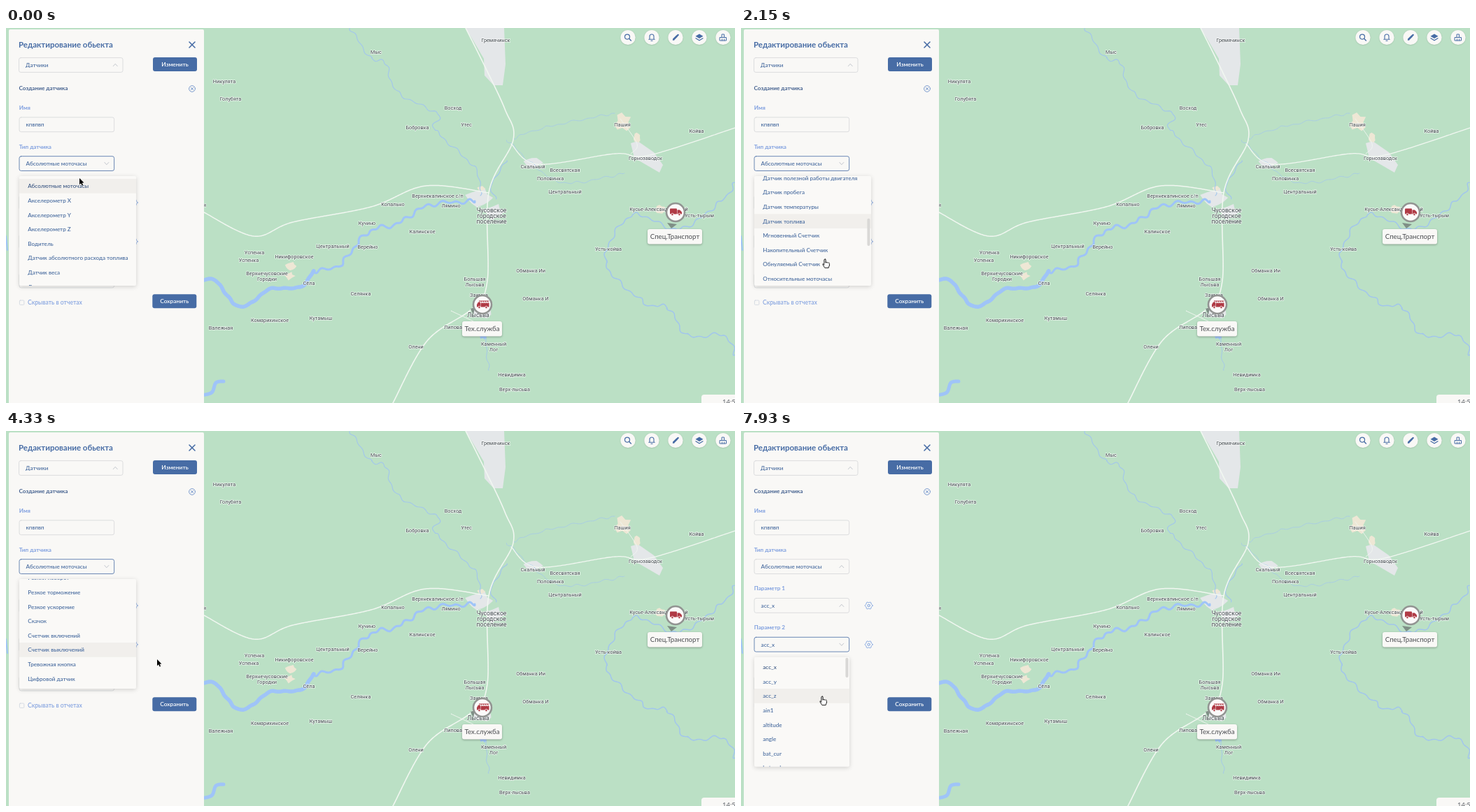
Recreate the animation shown at these times as an HTML page with a canvas. Size 1042 px wide and 537 px high, loop 7.99 s.

```html
<!DOCTYPE html>
<html lang="ru">
<head>
<meta charset="utf-8">
<title>Редактирование обьекта</title>
<style>
html, body { margin: 0; width: 100%; height: 100%; overflow: hidden; background: #bbe0c5; }
canvas { display: block; width: 1042px; height: 537px; }
</style>
</head>
<body>
<canvas id="stage" width="1042" height="537"></canvas>
<script>
const W = 1042, H = 537, LOOP = 7990, ROW = 20.6;
const BLUE = '#476ca5', LABEL = '#7f9fdf', PANEL = '#f9f8f6', INK = '#41669c', RED = '#b03a45';
const stage = document.getElementById('stage');
const screen = stage.getContext('2d');
let c = screen;

const clamp = v => Math.max(0, Math.min(1, v));
const smooth = p => p * p * (3 - 2 * p);
const easeOut = p => 1 - Math.pow(1 - p, 1.5);

// --- drawing helpers ---

function text(str, x, y, size, color, weight = 500, align = 'left') {
  c.font = `${weight} ${size}px Lato, sans-serif`;
  c.textAlign = align;
  c.fillStyle = color;
  c.fillText(str, x, y + size * 0.34);
}

function paint(fill, stroke, lw) {
  if (fill) { c.fillStyle = fill; c.fill(); }
  if (stroke) { c.strokeStyle = stroke; c.lineWidth = lw; c.stroke(); }
}

function box(x, y, w, h, r, fill, stroke, lw = 0.8) {
  c.beginPath();
  c.roundRect(x, y, w, h, r);
  paint(fill, stroke, lw);
}

function disc(x, y, r, fill, stroke, lw = 1) {
  c.beginPath();
  c.arc(x, y, r, 0, 7);
  paint(fill, stroke, lw);
}

function trace(pts) {
  c.beginPath();
  for (let i = 0; i < pts.length; i += 2) c.lineTo(pts[i], pts[i + 1]);
}

function line(pts, color, lw) {
  trace(pts);
  paint(null, color, lw);
}

function poly(pts, color, stroke, lw) {
  trace(pts);
  c.closePath();
  paint(color, stroke, lw);
}

function cross(x, y, r, color, lw) {
  line([x - r, y - r, x + r, y + r], color, lw);
  line([x + r, y - r, x - r, y + r], color, lw);
}

function shadowed(blur, dy, alpha, draw) {
  c.save();
  c.shadowBlur = blur;
  c.shadowOffsetY = dy;
  c.shadowColor = `rgba(0,0,0,${alpha})`;
  draw();
  c.restore();
}

// --- map ---

// Catmull-Rom curve through key points; wig adds meanders across it.
function curve(pts, color, lw, wig = 0) {
  const n = pts.length / 2, out = [];
  const at = (i, k) => pts[2 * Math.max(0, Math.min(n - 1, i)) + k];
  let run = 0;
  for (let i = 0; i < n - 1; i++) {
    const len = Math.hypot(at(i + 1, 0) - at(i, 0), at(i + 1, 1) - at(i, 1));
    for (let u = 0; u < 1; u += 2 / len) {
      const s = run + u * len;
      const w = wig * (Math.sin(s / 2.9) + 0.8 * Math.sin(s / 5.3 + 1));
      for (const k of [0, 1]) {
        const [a, b, d, e] = [-1, 0, 1, 2].map(j => at(i + j, k));
        const p = b + u * (d - a) / 2 + u * u * (a - 2.5 * b + 2 * d - e / 2) + u * u * u * (1.5 * (b - d) + (e - a) / 2);
        const side = (k ? 1 : -1) * (at(i + 1, 1 - k) - at(i, 1 - k)) / len;
        out.push(p + side * w);
      }
    }
    run += len;
  }
  out.push(...pts.slice(-2));
  line(out, color, lw);
}

// Irregular patch with a seeded outline.
function blob(x, y, rx, ry, color, seed) {
  const pts = [];
  for (let i = 0; i < 11; i++) {
    const a = i / 11 * Math.PI * 2;
    const r = 0.85 + 0.25 * Math.sin(seed * 7.3 + i * i * 2.1);
    pts.push(x + rx * r * Math.cos(a), y + ry * r * Math.sin(a));
  }
  poly(pts, color);
}

const PLACES = [
  ['Гремячинск', 700, 17], ['Мыс', 529, 34], ['Никулята', 312, 76], ['Голубята', 321, 101],
  ['Восход', 639, 114], ['Утес', 658, 138], ['Бобровка', 588, 142], ['Пашия', 881, 138],
  ['Койва', 987, 147], ['Горнозаводск', 914, 186], ['Скальный', 753, 198], ['Всесвятская', 799, 203],
  ['Половинка', 778, 215], ['Центральный', 799, 234], ['Верхнекалинское с/п', 617, 240],
  ['Копально', 553, 252], ['Лямино', 636, 254], ['Кучино', 516, 279], ['Калинское', 595, 291],
  ['Центральный', 467, 312], ['Верейно', 517, 313], ['Успенка', 355, 321], ['Успенка', 347, 332],
  ['Никифоровское', 412, 327], ['Верхнечусовские\nГородки', 373, 351], ['Сёла', 433, 365],
  ['Селянка', 507, 380], ['Кутамыш', 450, 415], ['Комарихинское', 377, 418], ['Валежная', 307, 429],
  ['Олени', 586, 456], ['Невидимка', 723, 496], ['Верх-лысьва', 727, 517], ['Каменный\nЛог', 697, 452],
  ['Липовая', 641, 428], ['Большая\nЛысьва', 670, 359], ['Заимка', 676, 382], ['Обманка Ии', 750, 347],
  ['Обманка И', 757, 387], ['Усть-койва', 861, 316], ['Усть-тырым', 991, 268],
  ['Кусье-Александровский', 933, 259], ['ая', 282, 253],
  ['Чусовское\nгородское\nпоселение', 694, 261, 8.6], ['Лысьва', 675, 411, 8.6]
];

function drawPlaces() {
  c.textAlign = 'center';
  for (const [name, x, y, size = 7.3] of PLACES) {
    c.font = `400 ${size}px Roboto, sans-serif`;
    c.strokeStyle = 'rgba(255,255,255,.75)';
    c.lineWidth = 1.6;
    c.fillStyle = '#3f474b';
    name.split('\n').forEach((s, i) => {
      const base = y + i * 8 + size * 0.35;
      c.strokeText(s, x, base);
      c.fillText(s, x, base);
    });
  }
}

function drawMap() {
  const water = '#9fc4f8', thin = '#a2c6ec', road = '#f1f7f1', town = '#e4e7e9', field = '#eee7d5';
  c.fillStyle = '#bbe0c5';
  c.fillRect(0, 0, W, H);

  poly([657, 0, 712, 0, 714, 52, 710, 82, 697, 82, 684, 68, 683, 44, 669, 20], town);
  poly([893, 165, 903, 162, 926, 178, 939, 196, 934, 207, 898, 186], town);
  blob(676, 243, 19, 13, town, 1);
  blob(697, 263, 17, 12, town, 2);
  blob(753, 193, 17, 10, town, 3);
  blob(681, 403, 18, 17, town, 4);
  blob(882, 135, 12, 13, field, 5);
  blob(902, 157, 5, 7, field, 6);
  blob(407, 341, 8, 6, field, 7);
  blob(405, 355, 8, 6, field, 8);
  blob(679, 230, 7, 5, field, 9);
  blob(935, 260, 9, 8, field, 10);

  curve([492, 0, 522, 44, 541, 48, 560, 92, 618, 124, 614, 146, 671, 202, 678, 240], thin, 1.1, 1.4);
  curve([726, 158, 768, 143, 870, 122], thin, 0.7, 1);
  curve([716, 160, 766, 206, 806, 222, 884, 208], thin, 0.7, 1.2);
  curve([1042, 222, 1024, 246, 962, 288, 895, 268, 857, 335, 914, 394, 946, 400, 974, 440, 1026, 440, 1042, 468], thin, 1.5, 1.7);
  curve([700, 245, 694, 224, 716, 190], thin, 1.2, 1);
  curve([684, 430, 690, 490], thin, 0.9, 1);

  curve([280, 360, 301, 363, 326, 395, 347, 396, 377, 374, 420, 371, 440, 348], water, 5.5, 0.6);
  curve([440, 348, 476, 340, 505, 305, 526, 288, 560, 280, 604, 254, 670, 248], water, 3, 2);
  curve([278, 526, 294, 522, 300, 508, 311, 506], water, 5);
  blob(682, 439, 5, 8, water, 11);

  curve([283, 264, 354, 298, 410, 278, 522, 256, 600, 226, 690, 236], road, 1.5);
  curve([657, 0, 682, 50, 713, 116, 725, 160, 690, 236, 688, 362, 666, 402, 602, 448, 553, 537], road, 1.6);
  curve([722, 166, 760, 195, 870, 180, 920, 182, 1042, 143], road, 1.3);
  curve([636, 405, 668, 420], road, 1);
  curve([893, 180, 902, 166, 878, 130], road, 0.9);
  curve([0, 298, 2, 318], water, 2);
  drawPlaces();
}

function tag(str, x, y, w) {
  shadowed(3, 1, 0.3, () => box(x, y, w, 21.5, 3, PANEL));
  text(str, x + w / 2, y + 10.7, 9.7, '#4a4c50', 400, 'center');
}

function badge(x, y) {
  disc(x, y, 13, '#fbfafa', '#929492', 2.6);
}

function wheels(y, ...xs) {
  for (const x of xs) disc(x, y, 1.7, RED, '#fbfafa', 0.8);
}

function drawMarkers() {
  poly([945, 279, 959, 281, 951, 287], '#7f8f86');
  badge(957, 264);
  box(949, 258.5, 10, 8, 1, RED);
  poly([959.5, 260.5, 963, 260.5, 966, 263.5, 966, 266.5, 959.5, 266.5], RED);
  wheels(267, 952.5, 962.5);
  tag('Спец.Транспорт', 917, 288, 78);

  poly([664, 402, 670, 400, 668, 411], '#7f8f86');
  badge(681, 396);
  box(678.5, 394, 12, 5.5, 0.5, RED);
  poly([673, 396, 675, 392.5, 678, 392.5, 678, 399.5, 673, 399.5], RED);
  line([676, 391, 690, 391], RED, 1);
  for (let x = 679; x < 690; x += 3) line([x, 391, x + 1.5, 394], RED, 0.8);
  wheels(400, 676.5, 686.5);
  tag('Тех.служба', 652, 420, 57);
}

// Icons are drawn around their own centre.
const ICONS = [
  function search() {
    disc(-1, -0.9, 3.5, null, BLUE, 1.2);
    line([1.6, 1.7, 4.4, 4.5], BLUE, 1.4);
  },
  function bell() {
    c.beginPath();
    c.moveTo(-3, 2.6);
    c.lineTo(-3, -1.5);
    c.arc(0, -1.5, 3, Math.PI, 0);
    c.lineTo(3, 2.6);
    c.lineTo(4.2, 2.7);
    c.lineTo(-4.2, 2.7);
    paint(null, BLUE, 1.1);
    line([-1, 4.7, 1, 4.7], BLUE, 1.1);
  },
  function pencil() {
    line([-2.5, 2.5, 2, -2], BLUE, 2.6);
    poly([-4.2, 4.3, -3.6, 1.4, -1.3, 3.7], BLUE);
    line([3.2, -3.2, 3.6, -3.6], BLUE, 2.4);
  },
  function layers() {
    poly([0, -5, 5.5, -1.7, 0, 1.5, -5.5, -1.7], BLUE);
    line([-5, 1.3, 0, 4.3, 5, 1.3], BLUE, 1.3);
  },
  function brush() {
    box(-4.5, 0, 9, 4.5, 0, null, BLUE, 1);
    box(-1.5, -4.5, 3, 4.5, 0, null, BLUE, 1);
    for (const x of [-1.5, 1.5]) line([x, 2, x, 4.5], BLUE, 0.9);
  }
];

function drawToolbar() {
  ICONS.forEach((icon, i) => {
    c.save();
    c.translate(889 + 34 * i, 13.5);
    shadowed(2, 0.5, 0.15, () => disc(0, 0, 10.6, PANEL));
    icon();
    c.restore();
  });
  box(994, 525, 60, 20, 4, PANEL);
  text('14:50', 1024, 535.5, 9.4, '#666a70', 400);
}

// --- side panel ---

function field(value, y, { x = 19, w = 135.6, open = false, chevron = true } = {}) {
  box(x, y - 10.4, w, 20.8, 2.6, PANEL, open ? BLUE : '#d5d6d8', 0.8);
  text(value, x + 9.6, y + 0.3, 8.1, INK);
  if (!chevron) return;
  const d = open ? 1.6 : -1.6, cx = x + w - 10.8;
  line([cx - 3, y - d, cx, y + d, cx + 3, y - d], '#b4b9c2', 0.8);
}

function gear(x, y) {
  const pts = [];
  for (let a = 0; a < 6.28; a += 0.13) {
    const r = 4.8 + 0.6 * Math.cos(a * 6);
    pts.push(x + r * Math.cos(a), y + r * Math.sin(a));
  }
  poly(pts, null, '#6f98dd', 0.9);
  disc(x, y, 1.7, null, '#6f98dd', 0.9);
}

function button(str, x, y) {
  box(x, y, 63, 20, 3, BLUE);
  text(str, x + 31.5, y + 10, 8.4, '#fff', 600, 'center');
}

const FIELDS = [
  ['Имя', 'кпвпвп'], ['Тип датчика', 'Абсолютные моточасы'],
  ['Параметр 1', 'acc_x'], ['Параметр 2', 'acc_x'], ['Описание', '']
];

function drawPanel(open) {
  box(4, 2, 279, 545, 2, PANEL);
  text('Редактирование обьекта', 18, 24, 11.5, BLUE, 700);
  cross(266, 24, 4, BLUE, 1.6);
  field('Датчики', 53, { x: 18.5, w: 148.5 });
  button('Изменить', 210, 42);
  text('Создание датчика', 18.5, 86.5, 8.2, '#44618f', 700);
  disc(266, 87, 4.4, null, '#5f86c4', 0.8);
  cross(266, 87, 1.8, '#5f86c4', 0.8);

  FIELDS.forEach(([label, value], i) => {
    const y = 138.3 + i * 55.8;
    text(label, 18.8, y - 24.3, 8.1, LABEL, 700);
    field(value, y, { open: open === i, chevron: i > 0 && i < 4 });
    if (label.startsWith('Параметр')) gear(182.6, y + 0.1);
  });
  box(19.4, 390, 6.4, 6.4, 1, PANEL, '#cfd5df');
  text('Скрывать в отчетах', 31, 393.2, 8.6, LABEL);
  button('Сохранить', 209.3, 381.3);
}

// --- drop-down lists ---

const withPrefix = (prefix, list) => list.map(s => prefix + ' ' + s);
const TYPES = [
  'Абсолютные моточасы', ...withPrefix('Акселерометр', ['X', 'Y', 'Z']), 'Водитель',
  ...withPrefix('Датчик', ['абсолютного расхода топлива', 'веса', 'зажигания',
    'мгновенного расхода топлива', 'напряжения', 'оборотов двигателя',
    'полезной работы двигателя', 'пробега', 'температуры', 'топлива']),
  'Мгновенный Счетчик', 'Накопительный Счетчик', 'Обнуляемый Счетчик', 'Относительные моточасы',
  'Относительный одометр', 'Превышение скорости', 'Произвольный датчик', 'Резкий поворот',
  'Резкое торможение', 'Резкое ускорение', 'Скачок', 'Счетчик включений', 'Счетчик выключений',
  'Тревожная кнопка', 'Цифровой датчик'
];
const PARAMS = ['acc_x', 'acc_y', 'acc_z', 'ain1', 'altitude', 'angle', 'bat_cur', 'bat_vol'];
const MENU_H = 157, PAD = 4.1;

// total: number of rows the scroll thumb stands for.
function menu({ items, y, w, scroll = 0, active, total, thumb, shown }) {
  if (shown <= 0) return;
  const x = 19, k = MENU_H / (total * ROW + 2 * PAD);
  c.save();
  c.globalAlpha = shown;
  c.translate(0, y);
  c.scale(1, 0.8 + 0.2 * shown);
  shadowed(6, 1.5, 0.16, () => box(x, 0, w, MENU_H, 2, '#faf9f7'));
  c.beginPath();
  c.rect(x, 0, w, MENU_H);
  c.clip();
  items.forEach((s, i) => {
    const top = PAD + i * ROW - scroll;
    if (i === active) {
      c.fillStyle = '#f1efec';
      c.fillRect(x, top, w, ROW);
    }
    text(s, 31.3, top + ROW / 2 + 0.2, 8.1, i ? INK : '#375481');
  });
  if (thumb) box(x + w - 5.6, scroll * k + 1, 4, MENU_H * k, 2, '#d9d8d6');
  c.restore();
}

const rowAt = (y, menuY, scroll = 0) => Math.max(0, Math.floor((y + scroll - menuY - PAD) / ROW));

// --- motion ---

// Wheel bursts: [start, notches]
const WHEEL = [[1210, 3], [2060, 2], [2690, 1], [3020, 1], [3470, 1]];
const MAX_SCROLL = TYPES.length * ROW + 2 * PAD - MENU_H;

function scrollAt(t) {
  const sum = WHEEL.reduce((s, [start, n]) =>
    s + n * 60.65 * easeOut(clamp((t - start) / (75 + 95 * n))), 0);
  return Math.min(MAX_SCROLL, sum);
}

// Pointer moves: [start, end, x, y]
const MOVES = [
  [50, 300, 46, 280], [300, 560, 155, 305], [560, 830, 112, 352], [860, 1050, 120, 331],
  [3640, 3930, 216, 327], [4540, 5110, 123, 247], [5990, 6440, 229, 311],
  [6700, 7330, 123, 303], [7600, 7910, 116, 380]
];

function mouseAt(t) {
  let x = 105, y = 215;
  for (const [from, to, u, v] of MOVES) {
    const p = smooth(clamp((t - from) / (to - from)));
    x += (u - x) * p;
    y += (v - y) * p;
  }
  // Slight lift while leaving the first list.
  y -= 11 * Math.sin(Math.PI * clamp((t - 3640) / 290));
  return [x, y];
}

// The highlight follows the pointer only while it moves.
function typeRow(t) {
  const at = t < 1650 ? Math.min(t, 1050) : t < 3640 ? 1650 : Math.min(t, 3800);
  return rowAt(mouseAt(at)[1], 212, scrollAt(at));
}

const fade = (t, from, to) => smooth(clamp((t - from) / 200)) * (1 - smooth(clamp((t - to) / 200)));

function arrow() {
  poly([0, 0, 0, 9.2, 2.1, 7.3, 3.6, 10.6, 5.1, 9.9, 3.7, 6.7, 6.4, 6.5], '#000');
}

function hand() {
  const outline = () => {
    box(-1.1, 0, 2.2, 9, 1.1, '#fff', '#111', 1);
    for (const i of [1, 2, 3]) box(-1.1 + i * 1.8, 4 + i * 0.4, 2, 5, 1, '#fff', '#111', 0.9);
    poly([-1.1, 8.2, -3, 6.6, -3, 8, -0.2, 12.5, 5.2, 12.5, 6.2, 8.4], '#fff', '#111', 0.9);
  };
  outline();
  box(-0.6, 5.5, 6.3, 4.5, 0.5, '#fff');
}

function pointer(t, x, y) {
  const overList = (t > 80 && t < 3830) || (t >= 5140 && t < 6070) || t > 7290;
  c.save();
  c.translate(x, y);
  (overList ? hand : arrow)();
  c.restore();
}

function render(t) {
  const [x, y] = mouseAt(t), scroll = scrollAt(t);
  const open = t < 4340 ? 1 : t >= 5370 && t < 6640 ? 2 : t >= 7430 ? 3 : -1;
  c.drawImage(scene, 0, 0);
  drawPanel(open);
  menu({
    items: TYPES, y: 212, w: 167, scroll, active: typeRow(t), total: TYPES.length,
    thumb: t >= 1210 && t < 3930, shown: fade(t, -200, 4340)
  });
  const params = { items: PARAMS, w: 136, total: 42, thumb: true };
  menu({ ...params, y: 268, active: 0, shown: fade(t, 5370, 6640) });
  menu({ ...params, y: 323.8, active: rowAt(y, 323.8), shown: fade(t, 7430, LOOP) });
  pointer(t, x, y);
}

// The map never changes, so it is drawn once.
const scene = document.createElement('canvas');
scene.width = W;
scene.height = H;
c = scene.getContext('2d');
c.lineJoin = c.lineCap = 'round';
drawMap();
drawMarkers();
drawToolbar();
c = screen;
c.lineJoin = c.lineCap = 'round';

let start;
function tick(now) {
  start ??= now;
  render((now - start) % LOOP);
  requestAnimationFrame(tick);
}
render(0);
requestAnimationFrame(tick);
</script>
</body>
</html>
```
